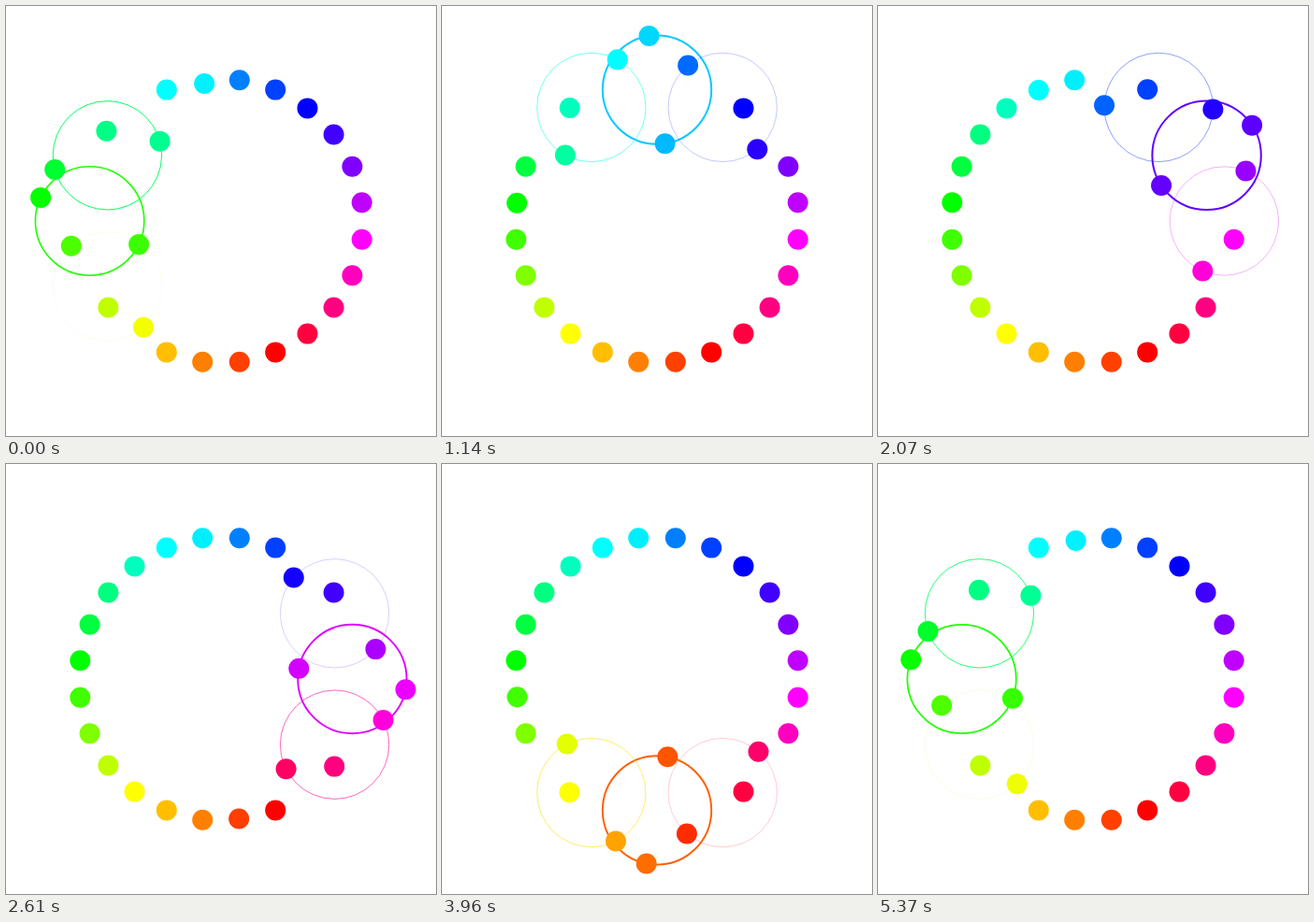
Write an HTML page with a canvas that moves like this. It is 460 by 460 pixels and loops after 5400 ms.

```html
<!DOCTYPE html>
<html lang="en">
<head>
<meta charset="utf-8">
<title>Swapping dots</title>
<style>
  html, body { margin: 0; width: 100%; height: 100%; overflow: hidden; background: #fff; }
  canvas { display: block; }
</style>
</head>
<body>
<canvas width="460" height="460"></canvas>
<script>
const ctx = document.querySelector('canvas').getContext('2d');
const LOOP = 5400, COUNT = 12, SPAN = 4.2, DELAY = 0.55;
const CENTER = 230, ORBIT = 140.4, RING = 58.2, DOT = 11;
const rad = deg => deg * Math.PI / 180;

// Cubic ease-in-out, control points (.42, 0) and (.58, 1)
function ease(x) {
  let s = x;
  for (let i = 0; i < 6; i++) {
    const error = s * (1.26 + s * (-0.78 + s * 0.52)) - x;
    s -= error / (1.26 + s * (-1.56 + s * 1.56));
  }
  return s * s * (3 - 2 * s);
}

// Hue follows the angle, with a widened cyan band
function color(angle) {
  let hue = (angle + 202.5 + 360) % 360;
  if (hue > 180 && hue < 210) hue = 180 + 30 * ((hue - 180) / 30) ** 3;
  return `hsl(${hue} 100% 50%)`;
}

function arc(x, y, r) {
  ctx.beginPath();
  ctx.arc(x, y, r, 0, 2 * Math.PI);
}

function dot(pair, turn, angle) {
  const a = rad(pair.angle + turn);
  arc(pair.x + RING * Math.cos(a), pair.y + RING * Math.sin(a), DOT);
  ctx.fillStyle = color(angle);
  ctx.fill();
}

function draw(ms) {
  const beat = ms % LOOP / LOOP * COUNT;
  const pairs = Array.from({ length: COUNT }, (_, k) => {
    const angle = k * 360 / COUNT;
    const age = (beat - k - DELAY + 2 * COUNT) % COUNT;
    return {
      angle,
      x: CENTER + ORBIT * Math.sin(rad(angle)),
      y: CENTER - ORBIT * Math.cos(rad(angle)),
      p: ease(Math.min(age / SPAN, 1))
    };
  });

  ctx.fillStyle = '#fff';
  ctx.fillRect(0, 0, 460, 460);

  for (const { angle, x, y, p } of pairs) {
    const width = 2 * Math.sin(Math.PI * p) ** 2;
    if (width < 0.01) continue;
    arc(x, y, RING);
    ctx.lineWidth = width;
    ctx.strokeStyle = color(angle);
    ctx.stroke();
  }

  // Each pair trades places by half a turn and trades hues on the way
  for (const pair of pairs) {
    const shift = 22.5 - 45 * pair.p;
    dot(pair, 180 * pair.p, pair.angle + shift);
    dot(pair, 180 + 180 * pair.p, pair.angle - shift);
  }
}

function frame() {
  draw(performance.now());
  requestAnimationFrame(frame);
}
frame();
</script>
</body>
</html>
```
